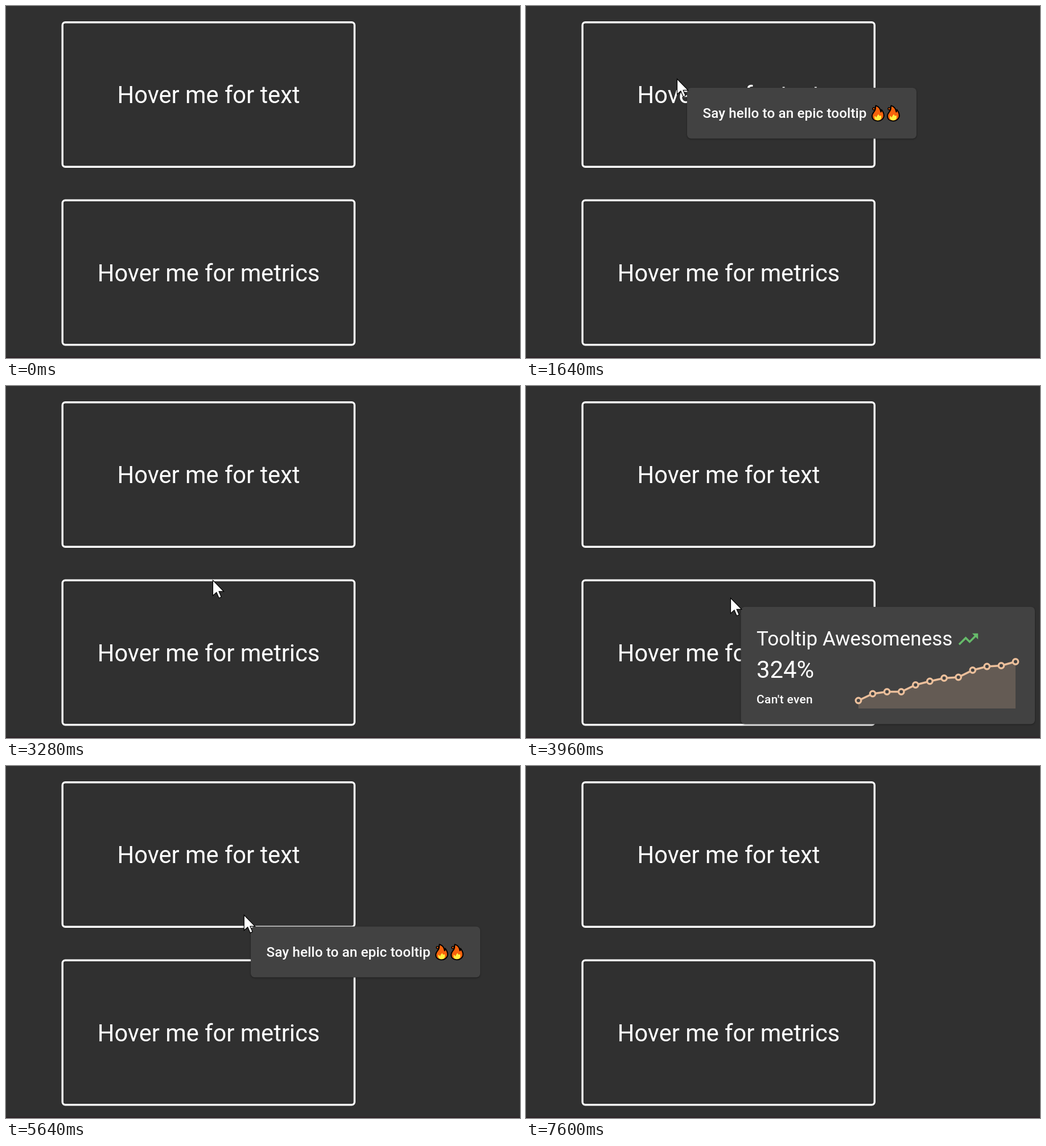
Recreate the animation shown at these times as an HTML page. Size 903 by 620 pixels, loop 8 s.

```html
<!DOCTYPE html>
<html lang="en">
<head>
<meta charset="utf-8">
<title>Tooltip demo</title>
<style>
  html, body { margin: 0; width: 100%; height: 100%; overflow: hidden; background: #303030; }
  svg { display: block; width: 903px; height: 620px; font-family: Roboto, sans-serif; fill: #fff; }
  .box { fill: none; stroke: #fff; stroke-width: 3.4px; }
  .label { font-size: 41.6px; text-anchor: middle; }
  .card { fill: #424242; filter: drop-shadow(0 1.5px 1.5px rgba(0, 0, 0, .4)); }
  .message { font-size: 24.2px; font-weight: 500; letter-spacing: .12px; }
  .title { font-size: 35px; }
  .value { font-size: 41.8px; }
  .note { font-size: 20.9px; font-weight: 500; letter-spacing: .35px; }
  .line { fill: none; stroke: #ebbf9b; stroke-width: 3.5px; }
  .dot { fill: #424242; stroke: #ebbf9b; stroke-width: 3.4px; }
  #beam { mix-blend-mode: difference; }
  #text-tip, #metric-tip, #arrow, #beam { visibility: hidden; }
</style>
</head>
<body>
<svg viewBox="0 0 903 620">
  <defs>
    <g id="flame">
      <path d="M8 1C15 3 16 8 17 12C18 11 18 9 18 8C22 13 23 17 22 21C20 26 16 28 11.5 28C6 28 1.5 25 1.5 19C1.5 14 6 12 7 8C8 5 7 3 8 1Z" fill="#f7630c" stroke="#000" stroke-width="2" stroke-linejoin="round"/>
      <path d="M6 19C8 20 8 21 9 22C10 19 11 18 13 16C13 19 16 20 17 18C19 24 16 27 11.5 27C7 27 5 24 6 19Z" fill="#fff03f"/>
      <circle cx="4.5" cy="6.5" r="2" fill="#f7630c" stroke="#000" stroke-width="1.5"/>
    </g>
  </defs>

  <rect width="903" height="620" fill="#303030"/>
  <rect y="618.5" width="903" height="1.5" fill="#2b1f25"/>
  <rect class="box" x="99.2" y="28.7" width="513.1" height="254.6" rx="5"/>
  <rect class="box" x="99.2" y="342.2" width="513.1" height="254.6" rx="5"/>
  <text class="label" x="356" y="171">Hover me for text</text>
  <text class="label" x="356" y="484.5">Hover me for metrics</text>

  <g id="text-tip">
    <rect class="card" width="403" height="89.5" rx="7"/>
    <text class="message" x="27.5" y="53">Say hello to an epic tooltip</text>
    <use href="#flame" x="323.5" y="30.5"/>
    <use href="#flame" x="350.5" y="30.5"/>
  </g>

  <g id="metric-tip">
    <rect class="card" width="516.5" height="206.5" rx="7"/>
    <text class="title" x="27.5" y="67.5">Tooltip Awesomeness</text>
    <path transform="translate(378.8 36.5) scale(1.722)" fill="#66bb6a" d="M16 6l2.29 2.29-4.88 4.88-4-4L2 16.59 3.41 18l6-6 4 4 6.3-6.29L22 12V6z"/>
    <text class="value" x="27.5" y="124.5">324%</text>
    <text class="note" x="27.5" y="169.5">Can't even</text>
    <g id="chart"></g>
  </g>

  <path id="arrow" d="M.5 .5V27.5L6.9 21.8L11.2 31.8L15.4 30L11.2 20.3H19.8Z" stroke="#000" stroke-width="1.2"/>
  <path id="beam" d="M-6 -14H9V-12H2.5V12H9V14H-6V12H.5V-12H-6Z"/>
</svg>

<script>
  const byId = id => document.getElementById(id);
  const textTip = byId('text-tip'), metricTip = byId('metric-tip');
  const arrow = byId('arrow'), beam = byId('beam');

  const LOOP = 8000, STEP = 40, LAG = 20, OFFSET = 16;
  const ENTER = 640, LEAVE = 7600;

  // Pointer path: time, x, y, ease-out power of the move that ends here
  const path = [
    [640, 222, 16], [1440, 219, 117, 1.5],
    [1620, 267, 128], [1640, 265, 128], [2280, 353, 155, 1.6],
    [2560, 353, 155], [2600, 353, 174], [3400, 363.5, 352, 1.5],
    [3600, 365, 375], [3800, 365, 375], [3940, 361.5, 373],
    [3960, 359, 373], [4400, 288, 366, 1.4],
    [4640, 288, 366], [4900, 275, 371], [5000, 275, 371],
    [5480, 386, 303, 1.3], [6120, 472, 192, 1.6],
    [6480, 472, 192], [6500, 470.5, 180], [6520, 471, 180],
    [6880, 440, 78, 1.4], [7200, 440, 78], [7560, 433, 2]
  ];

  function pointerAt(t) {
    const i = path.findIndex(key => key[0] > t);
    if (i === 0) return path[0].slice(1, 3);
    if (i < 0) return path[path.length - 1].slice(1, 3);
    const [t0, x0, y0] = path[i - 1];
    const [t1, x1, y1, power = 1] = path[i];
    const k = 1 - (1 - (t - t0) / (t1 - t0)) ** power;
    return [x0 + (x1 - x0) * k, y0 + (y1 - y0) * k];
  }

  function drawChart() {
    const heights = [165, 153, 149.5, 149.5, 137.5, 131, 125.5, 124, 111.5, 105, 103.5, 96.5];
    const points = heights.map((y, i) => [206.5 + i * 276 / 11, y]);
    const line = 'M' + points.join('L');
    byId('chart').innerHTML =
      `<path d="${line}V179H206.5Z" fill="#ebbf9b" fill-opacity=".2"/>` +
      `<path class="line" d="${line}"/>` +
      points.map(([x, y]) => `<circle class="dot" cx="${x}" cy="${y}" r="4.7"/>`).join('');
  }

  function place(el, shown, x, y) {
    el.style.visibility = shown ? 'visible' : 'hidden';
    el.setAttribute('transform', `translate(${x} ${y})`);
  }

  const within = (x, y, left, top, right, bottom) =>
    x >= left && x <= right && y >= top && y <= bottom;

  function render(now) {
    const t = Math.floor(now % LOOP / STEP) * STEP;
    const shown = t >= ENTER && t < LEAVE;
    const [x, y] = pointerAt(t);
    const [hx, hy] = pointerAt(t - LAG);
    const overText = within(x, y, 197, 133, 515, 181);

    place(arrow, shown && !overText, x, y);
    place(beam, shown && overText, x, y);
    place(textTip, shown && within(hx, hy, 98, 27, 614, 285), hx + OFFSET, hy + OFFSET);
    place(metricTip, shown && within(hx, hy, 98, 341, 614, 598), hx + OFFSET, hy + OFFSET);
  }

  drawChart();
  const start = performance.now();
  function tick() {
    render(performance.now() - start);
    requestAnimationFrame(tick);
  }
  tick();
</script>
</body>
</html>
```
